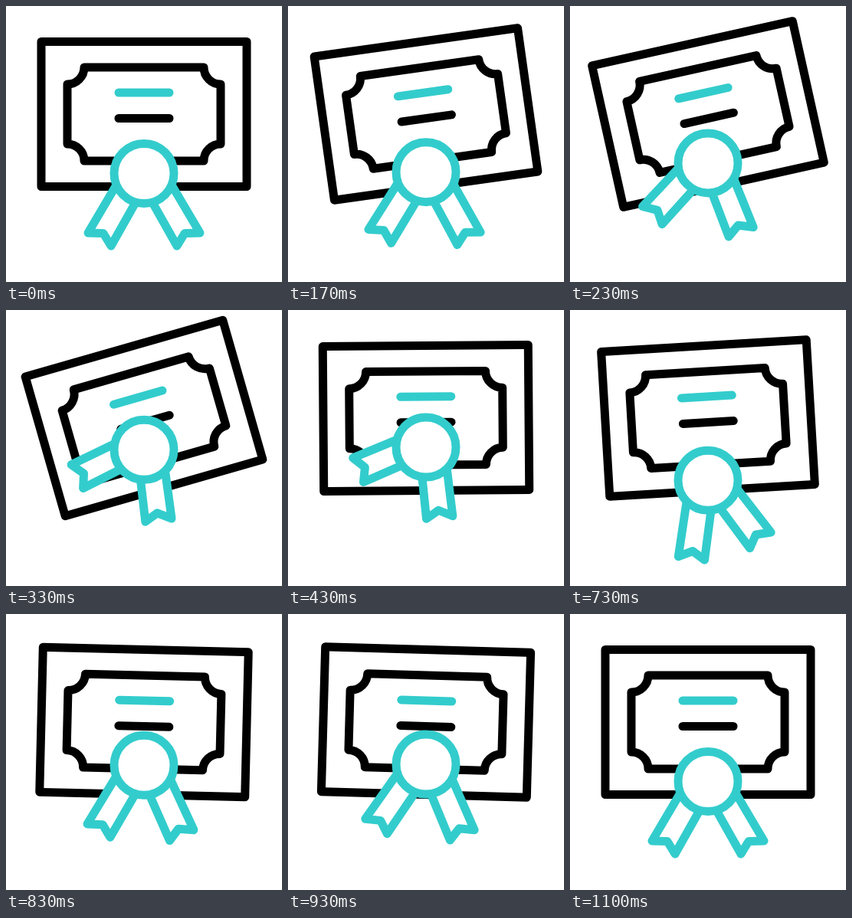
Write an HTML page that moves like this. It is 360 by 360 pixels and loops after 1670 ms.

```html
<!DOCTYPE html>
<html lang="en">
<head>
<meta charset="utf-8">
<title>Certificate</title>
<style>
  html, body { margin: 0; width: 100%; height: 100%; overflow: hidden; background: #fff; }
  svg { display: block; width: 100%; height: 100%; }
  .dark { stroke: #000; }
  .teal { stroke: #33cccc; }
</style>
</head>
<body>
<svg viewBox="0 0 360 360" fill="#fff" stroke-width="11" stroke-linecap="round" stroke-linejoin="round">
  <g id="sheet" class="dark">
    <rect x="46" y="46.5" width="268" height="189"/>
    <path d="M102 80H258A22 22 0 0 0 280 102V180A22 22 0 0 0 258 202H102A22 22 0 0 0 80 180V102A22 22 0 0 0 102 80Z"/>
    <path class="teal" d="M147 113H213"/>
    <path d="M147 146.5H213"/>
  </g>
  <g id="medal" class="teal">
    <path id="left" d="M-37 16.5L-73 77.5L-53 78L-43 94.5L-12 39.5"/>
    <path id="right" d="M37 16.5L73 77.5L53 78L43 94.5L12 39.5"/>
    <circle r="39"/>
  </g>
</svg>
<script>
const FPS = 30, LOOP = 1670;

// Each track is a list of [step, value] keys, eased in and out.
const tracks = {
  tilt:  [[0, 0], [10, -16], [15, 8], [21, -4], [26, 2], [33, 0]],
  lift:  [[4, 0], [12, -43], [19, 20], [26.5, -26], [33, 0]],
  left:  [[4, 0], [12, 40], [20, -30], [26.5, 5.5], [33, 0]],
  right: [[4, 0], [12, 27], [18, -20], [26.5, 8], [33, 0]],
  tuck:  [[4, 0], [11, 10.5], [16.5, 10.5], [19.5, 0]]
};

const ease = u => u * u * (3 - 2 * u);

function value(name, step) {
  const keys = tracks[name];
  const next = keys.findIndex(key => key[0] > step);
  if (next === 0) return keys[0][1];
  if (next < 0) return keys[keys.length - 1][1];
  const [s0, v0] = keys[next - 1], [s1, v1] = keys[next];
  return v0 + (v1 - v0) * ease((step - s0) / (s1 - s0));
}

const place = (id, transform) =>
  document.getElementById(id).setAttribute('transform', transform);

function draw(ms) {
  const step = Math.floor((ms + 3.4) * FPS / 1000);
  const at = name => value(name, step);
  const tuck = at('tuck');
  place('sheet', `rotate(${at('tilt')} 180 141)`);
  place('medal', `translate(180 ${218.5 + at('lift')})`);
  // Ribbons swing about the medal and slide in along their own length.
  place('left', `rotate(${at('left')}) translate(${tuck * 0.5} ${-tuck * 0.866})`);
  place('right', `rotate(${at('right')}) translate(${-tuck * 0.5} ${-tuck * 0.866})`);
}

const start = performance.now();
function tick() {
  draw((performance.now() - start) % LOOP);
  requestAnimationFrame(tick);
}
tick();
</script>
</body>
</html>
```
